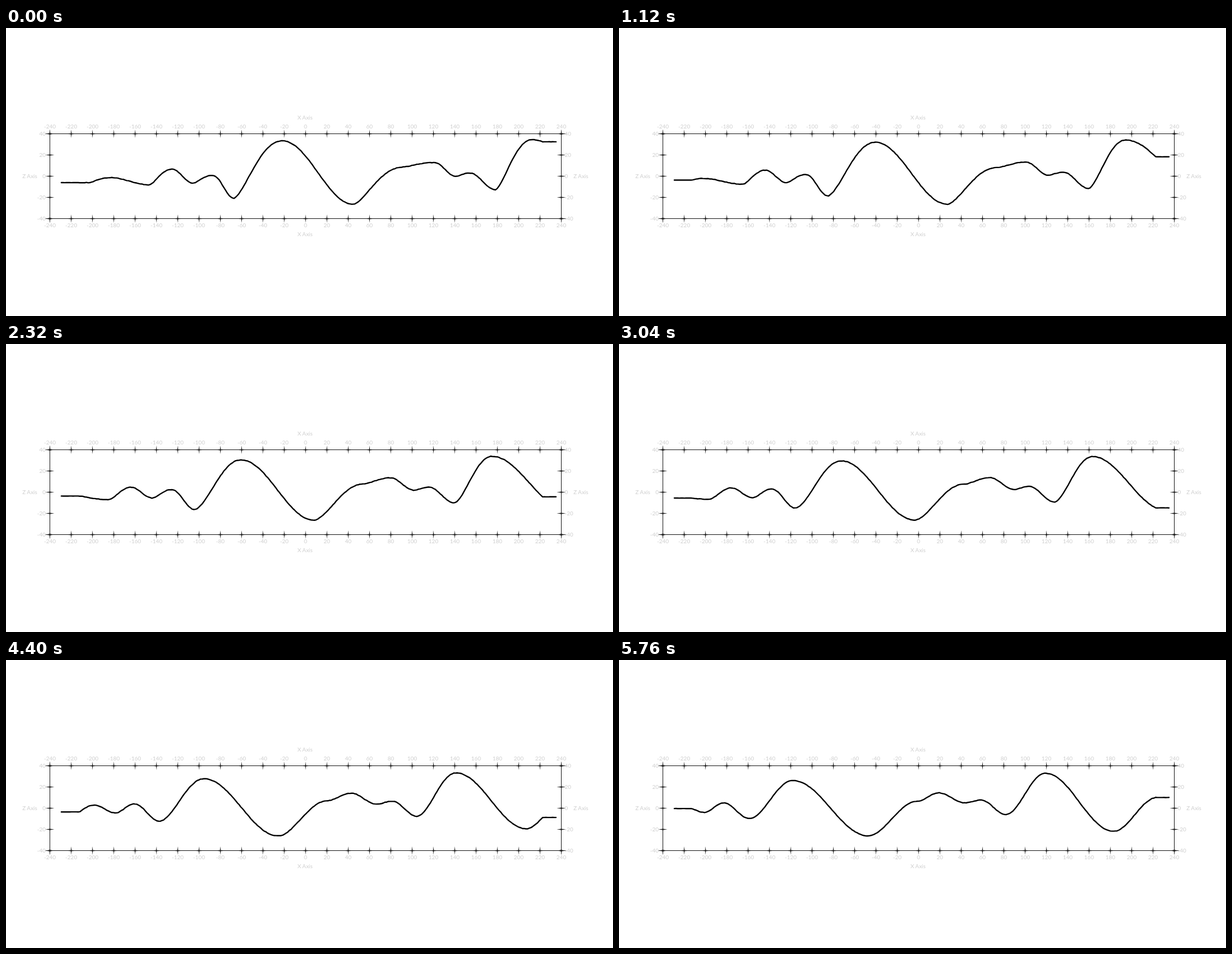
Write an HTML page that moves like this. It is 1086 px wide and 516 px high and loops after 5840 ms.

```html
<!DOCTYPE html>
<html lang="en">
<head>
<meta charset="utf-8">
<title>Travelling profile</title>
<style>
  html, body { margin: 0; width: 100%; height: 100%; overflow: hidden; background: #fff; }
  svg { display: block; width: 100%; height: 100%; }
  text { font: 10px Lato, Inter, sans-serif; fill: #cfcfcf; }
  .frame { fill: none; stroke: #111; stroke-width: 1; }
  .tick { fill: #111; }
  .wave { fill: none; stroke: #000; stroke-width: 2.4; stroke-linejoin: round; stroke-linecap: round; }
</style>
</head>
<body>
<svg id="stage" viewBox="0 0 1086 516"></svg>
<script>
const stage = document.getElementById('stage');
const LOOP = 5840, STEP = 80, LAST = LOOP - STEP;
const box = { left: 78.5, right: 993.5, top: 189.5, bottom: 341.5 };

// Crests and troughs in turn: x, y at the start and x, y at the end.
const turns = [
  [148, 277, -34, 277], [186, 268, 4, 276], [257, 281, 75, 276],
  [297, 253, 115, 262], [335, 278, 153, 273], [370, 264, 187, 256],
  [408, 305, 233, 284], [494, 202, 311, 216], [622, 316, 446, 315],
  [711, 249, 534, 253], [766, 241, 572, 238], [805, 266, 619, 256],
  [830, 260, 648, 251], [876, 290, 692, 277], [941, 200, 763, 203],
  [1082, 288, 885, 307], [1146, 248, 964, 246]
];

function add(name, attrs, content) {
  const el = document.createElementNS('http://www.w3.org/2000/svg', name);
  for (const key in attrs) el.setAttribute(key, attrs[key]);
  if (content !== undefined) el.textContent = content;
  stage.appendChild(el);
  return el;
}

function label(x, y, content, anchor = 'middle') {
  add('text', { x, y: y + 3.6, 'text-anchor': anchor }, content);
}

// Tapered cross: long thin diamonds along both axes.
function tick(x, y, w, h) {
  const diamond = (a, b) => `M${x - a} ${y}L${x} ${y - b}L${x + a} ${y}L${x} ${y + b}Z`;
  add('path', { class: 'tick', d: diamond(w, 0.9) + diamond(0.8, h) });
}

function drawAxes() {
  const { left, right, top, bottom } = box;
  add('rect', { class: 'frame', x: left, y: top, width: right - left, height: bottom - top });
  for (let v = -240; v <= 240; v += 20) {
    const x = left + (v + 240) / 480 * (right - left);
    tick(x, top, 10, 7.5);
    tick(x, bottom, 10, 7.5);
    label(x, 176.3, v);
    label(x, 353, v);
  }
  for (let v = -40; v <= 40; v += 20) {
    const y = bottom - (v + 40) / 80 * (bottom - top);
    tick(left, y, 8, 8);
    tick(right, y, 8, 8);
    label(71, y - 0.4, v, 'end');
    label(999.5, y - 0.4, v, 'start');
  }
  label(535, 160, 'X Axis');
  label(535, 369, 'X Axis');
  label(42.5, 265, 'Z Axis');
  label(1028.5, 265, 'Z Axis');
}

const mix = (a, b, p) => a + (b - a) * p;

// Half a cosine between turns; rises lead early in the loop and even out later.
function height(pts, x, p) {
  let i = 0;
  while (i < pts.length - 2 && x > pts[i + 1][0]) i++;
  const [x0, y0] = pts[i], [x1, y1] = pts[i + 1];
  const s = Math.min(1, Math.max(0, (x - x0) / (x1 - x0)));
  const lead = y1 < y0 ? mix(0.74, 0.96, p) : 1;
  return mix(y0, y1, (1 - Math.cos(Math.PI * s ** lead)) / 2);
}

function noise(i, step) {
  const v = Math.sin(i * 12.9898 + step * 78.233) * 43758.5453;
  return v - Math.floor(v) - 0.5;
}

function wavePath(step) {
  const p = step * STEP / LAST;
  const pts = turns.map(([x0, y0, x1, y1]) => [mix(x0, x1, p), mix(y0, y1, p)]);
  const path = [];
  for (let x = 99; x <= 986; x += 3) {
    const inner = Math.min(960, Math.max(131, x)); // both ends run level
    const rough = inner === x ? 0.8 : 0.2;
    path.push(x + ' ' + (height(pts, inner, p) + rough * noise(x, step)).toFixed(2));
  }
  return 'M' + path.join('L');
}

drawAxes();
const wave = add('path', { class: 'wave' });
let shown = -1;

function draw() {
  const step = Math.floor(performance.now() % LOOP / STEP);
  if (step !== shown) {
    wave.setAttribute('d', wavePath(step));
    shown = step;
  }
  requestAnimationFrame(draw);
}
draw();
</script>
</body>
</html>
```
